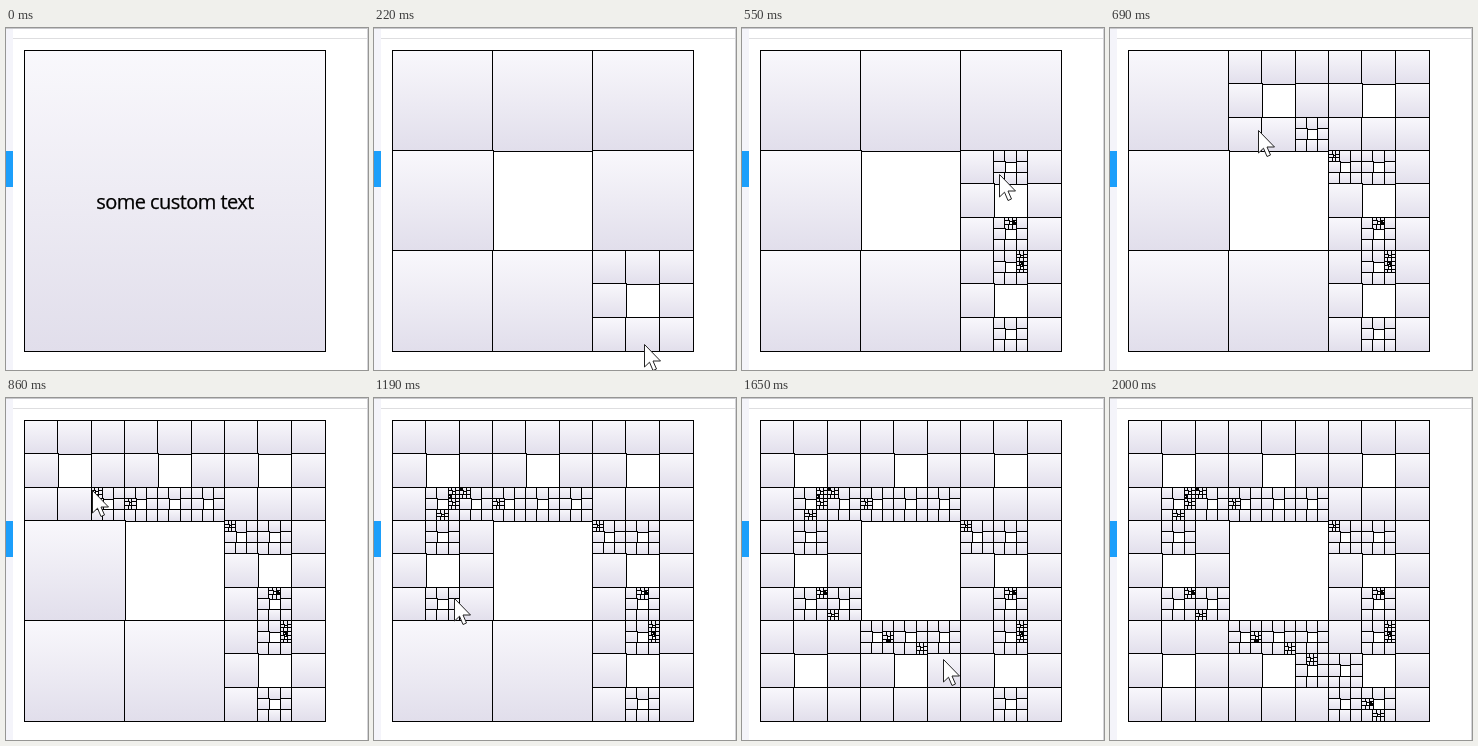
An HTML page with a canvas for the animation above (2.78 s loop, 362x342 px).

```html
<!DOCTYPE html>
<html lang="en">
<head>
<meta charset="utf-8">
<title>Carpet</title>
<style>
  html, body { margin: 0; width: 100%; height: 100%; overflow: hidden; background: #fff; }
  #stage { position: relative; width: 362px; height: 342px; overflow: hidden; }
  #stage > * { position: absolute; margin: 0; }
  .side { left: 0; top: 0; width: 7px; height: 342px; background: #f4f4fa; }
  .mark { left: 0; top: 123px; width: 7px; height: 36px; background: #1c9ffb; }
  .top { left: 0; top: 0; width: 362px; height: 1px; background: #c8c8cc; }
  .rule { left: 7px; top: 10px; width: 355px; height: 1px; background: #dedee0; }
  .edge { left: 361px; top: 0; width: 1px; height: 342px; background: #d4d4d8; }
  canvas { left: 0; top: 0; }
  #label {
    left: 19px; top: 160px; width: 300px; text-align: center; white-space: nowrap;
    font: 20px/27px "Open Sans", "Noto Sans", sans-serif; letter-spacing: -.55px;
    color: #000; -webkit-text-stroke: .25px #000;
  }
</style>
</head>
<body>
<div id="stage">
  <div class="side"></div>
  <div class="mark"></div>
  <div class="top"></div>
  <div class="rule"></div>
  <div class="edge"></div>
  <canvas id="view" width="362" height="342"></canvas>
  <p id="label">some custom text</p>
</div>
<script>
const LOOP = 2780;
const ctx = document.getElementById("view").getContext("2d");
const label = document.getElementById("label");

// Each step: start time, cells split (digit path, 0-8 per level), pointer tip.
const steps = [
  [0, ""],
  [220, "root 8", 270, 316],
  [300, "87", 283, 283],
  [380, "81 815 8151 812 5", 280, 232],
  [460, "57 571 5715", 271, 195],
  [540, "51", 257, 146],
  [620, "50 500 2 1", 215, 119],
  [690, "18", 148, 102],
  [780, "17 16 163", 121, 104],
  [860, "0 08 080", 86, 92],
  [940, "0800 07 072 0726", 79, 97],
  [1030, "075 077", 71, 118],
  [1110, "3 31", 70, 150],
  [1190, "37", 80, 200],
  [1270, "372 3725", 88, 220],
  [1350, "38 386 6", 108, 232],
  [1410, "7 70", 147, 243],
  [1500, "705 7057 71", 178, 249],
  [1590, "718 72", 201, 261],
  [1670, "75 751 83", 224, 277],
  [1750, "86", 246, 296],
  [1840, "873 8735", 263, 312],
  [1920, "877", 272, 333],
  [2000, ""]
];

function drawCell(x, y, size) {
  const left = Math.round(x), top = Math.round(y);
  const w = Math.round(x + size + 2) - left;
  const h = Math.round(y + size + 2) - top;
  const fill = ctx.createLinearGradient(0, top, 0, top + h);
  fill.addColorStop(0, "#f9f8fc");
  fill.addColorStop(1, "#e1deeb");
  ctx.fillStyle = "#000";
  ctx.fillRect(left, top, w, h);
  ctx.fillStyle = fill;
  ctx.fillRect(left + 1, top + 1, w - 2, h - 2);
}

function drawTree(split, path, x, y, size) {
  if (!split.has(path || "root")) return drawCell(x, y, size);
  const part = size / 3;
  for (let i = 0; i < 9; i++) {
    if (i === 4) continue; // the middle stays open
    drawTree(split, path + i, x + (i % 3) * part, y + Math.floor(i / 3) * part, part);
  }
}

const arrow = new Path2D("M.5 .5V23L5.5 18.2L9 26.5L12.5 25L9 17H16.5Z");

function drawPointer(x, y) {
  ctx.save();
  ctx.translate(x, y);
  ctx.fillStyle = "#fff";
  ctx.strokeStyle = "#222";
  ctx.fill(arrow);
  ctx.stroke(arrow);
  ctx.restore();
}

function render(index) {
  const split = new Set(steps.slice(0, index + 1).flatMap(s => s[1].split(" ")));
  const [, , x, y] = steps[index];
  ctx.clearRect(0, 0, 362, 342);
  drawTree(split, "", 18, 22, 300);
  if (x !== undefined) drawPointer(x, y);
  label.hidden = index > 0;
}

const start = performance.now();
let shown = -1;

function tick() {
  const t = (performance.now() - start) % LOOP;
  const index = steps.findLastIndex(s => s[0] <= t);
  if (index !== shown) render(shown = index);
  requestAnimationFrame(tick);
}
tick();
</script>
</body>
</html>
```
